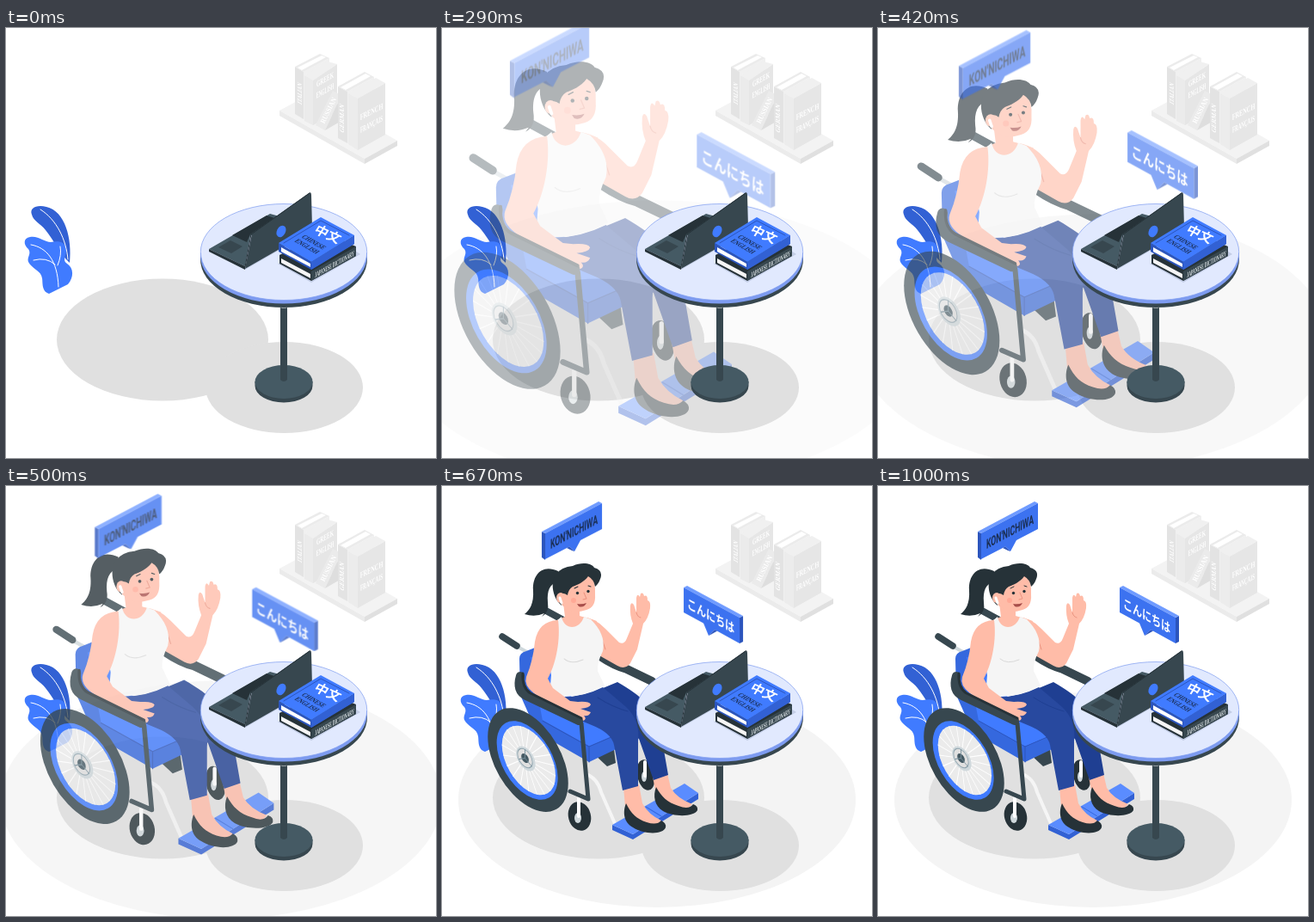
Write an HTML page that moves like this. It is 500x500 px and loops after 1040 ms.

```html
<!DOCTYPE html>
<html lang="en">
<head>
<meta charset="utf-8">
<style>
  html, body { margin: 0; width: 100%; height: 100%; overflow: hidden; background: #fff }
  svg { display: block; width: 100%; height: 100% }
  text { text-anchor: middle; dominant-baseline: central; font-weight: bold }
  .serif { font-family: "Liberation Serif", serif }
  .cjk { font-family: "Noto Sans CJK JP", "Noto Sans CJK", sans-serif }
  .line { fill: none; stroke-linecap: round; stroke-linejoin: round }
  .skin { fill: #ffbca8 }
  .dark { fill: #263238 }
  .frame { stroke: #37474f }
</style>
</head>
<body>
<svg viewBox="0 0 500 500">
  <ellipse id="floor" cx="250" cy="365" rx="231" ry="125" fill="#f4f4f4"/>
  <g fill="#e0e0e0">
    <ellipse cx="182" cy="362.5" rx="123" ry="71"/>
    <ellipse cx="323.5" cy="418" rx="91.5" ry="53"/>
  </g>

  <g id="shelf">
    <path fill="#f3f3f3" d="M318 96 357 75 455 131 417 152Z"/>
    <path fill="#ebebeb" d="M318 96 417 152V158L318 102Z"/>
    <path fill="#e0e0e0" d="M417 152 455 131V137L417 158Z"/>
    <path fill="#f0f0f0" d="M346 51 376 35V89L346 106Z"/>
    <path fill="#e3e3e3" d="M336 45 346 51V106L336 100Z"/>
    <path fill="#ebebeb" d="M336 45 365 30 376 35 346 51Z"/>
    <path fill="#fff" d="M339 46 367 32 372 34 344 49Z"/>
    <path fill="#e6e6e6" d="M357 61 385 42V98L357 113Z"/>
    <path fill="#ebebeb" d="M347 55 357 61V113L347 108Z"/>
    <path fill="#f0f0f0" d="M347 55 374 39 385 42 357 61Z"/>
    <path fill="#ebebeb" d="M360 113 380 73 390 78 371 119Z"/>
    <path fill="#dedede" d="M371 119 390 78V108Z"/>
    <path fill="#f0f0f0" d="M397 74 428 57V117L397 134Z"/>
    <path fill="#e3e3e3" d="M386 68 397 74V134L386 128Z"/>
    <path fill="#ebebeb" d="M386 68 417 51 428 57 397 74Z"/>
    <path fill="#fff" d="M389 69 418 53 424 56 395 72Z"/>
    <path fill="#e6e6e6" d="M409 82 441 64V124L409 142Z"/>
    <path fill="#ececec" d="M398 76 409 82V142L398 135Z"/>
    <path fill="#f0f0f0" d="M398 76 430 58 441 64 409 82Z"/>
    <g class="serif" fill="#fff" font-size="9">
      <text transform="matrix(0 -.65 .87 .5 341 76)">ITALIAN</text>
      <text transform="matrix(.62 -.36 0 1.1 371 60)">GREEK</text>
      <text transform="matrix(.5 -.29 0 1.1 371 73)">ENGLISH</text>
      <text transform="matrix(.36 -.74 .85 .45 375 96)">RUSSIAN</text>
      <text transform="matrix(0 -.8 .87 .5 391 105)">GERMAN</text>
      <text transform="matrix(.7 -.36 0 1.1 425 97)">FRENCH</text>
      <text transform="matrix(.56 -.3 0 1.1 425 112)">FRANÇAIS</text>
    </g>
  </g>

  <g id="plant">
    <path fill="#3261d4" d="M74 273C77 245 69 213 47 208C36 205 27 209 30 217C32 225 40 227 46 235C56 247 62 262 74 273Z"/>
    <path fill="#407bff" d="M50 309C41 306 43 296 42 291C41 282 30 280 26 272C24 266 30 263 26 257C20 252 20 244 28 243C37 241 45 249 52 249C60 247 69 248 70 257C70 266 65 270 71 274C79 279 79 290 72 298Z"/>
    <path class="line" stroke="#fff" d="M40 211C59 223 70 246 72 269M29 252C47 255 60 270 61 301M32 270Q47 266 57 275M63 254Q65 264 60 276"/>
  </g>

  <g id="person">
    <!-- backrest, far armrest and seat -->
    <path class="line frame" stroke-width="8" d="M121 145 143 157"/>
    <path class="line" stroke="#cfd8dc" stroke-width="4" d="M88 187 108 198"/>
    <path class="line frame" stroke-width="7.500" d="M70 175 87 186"/>
    <path fill="#37474f" d="M177 312 200 306 202 322 192 326Z"/>
    <path fill="#3568de" d="M90 201Q90 194 98 192L113 186 140 240 218 278 219 298 171 321 110 286 91 243Z"/>
    <path fill="#407bff" d="M103 199 135 195 142 240 220 282 171 303 117 273Z"/>
    <path class="line" stroke="#2c55bd" d="M117 273 171 303 220 282M171 303V321"/>
    <path class="line frame" stroke-width="10" d="M184 198Q200 209 215 213L244 227"/>
    <path class="line" stroke="#f5f5f5" stroke-width="4" d="M168 335Q181 340 185 356L203 397M226 318 236 340"/>
    <ellipse class="dark" cx="237" cy="336" rx="10" ry="18" transform="rotate(-12 237 336)"/>
    <ellipse fill="#cfd8dc" cx="235" cy="338" rx="3" ry="6"/>
    <path class="line" stroke="#fff" stroke-width="4" d="M236 321V337"/>

    <!-- footrests -->
    <path fill="#3261d4" d="M198 394 222 405 298 357V364L222 411 198 400Z"/>
    <path fill="#5a8cff" d="M198 394 282 346 298 357 222 405Z"/>
    <path class="line" stroke="#3568de" d="M237 373 255 384"/>

    <!-- legs -->
    <path class="skin" d="M245 338 262 334 266 351Q273 363 291 370L282 379 256 369 248 354Z"/>
    <path class="dark" d="M249 350C245 360 247 372 257 378C269 385 293 385 297 377Q298 372 292 370Q287 377 275 372C262 368 255 361 249 350Z"/>
    <path class="skin" d="M211 350 229 347 233 369Q240 382 255 389L246 399 221 389 213 373Z"/>
    <path class="dark" d="M214 369C210 379 211 391 222 397C234 405 257 406 260 397Q261 392 255 389Q250 395 238 391C226 387 220 381 214 369Z"/>
    <path fill="#1f3f92" d="M175 240 204 228C232 244 249 260 253 279L263 336 246 342 229 294 200 278Z"/>
    <path fill="#28499f" d="M125 244Q157 249 187 234L213 256Q231 272 228 298V349L210 354 200 301Q197 287 174 278L143 265Z"/>
    <path class="line" stroke="#1f3f92" d="M181 246Q198 257 216 262"/>

    <!-- raised arm -->
    <path class="skin" d="M162 152Q178 153 190 166L206 182Q212 185 215 177L222 160Q218 150 219 139Q220 134 223 138L226 147L226 130Q227 124 230 129L231 125Q234 123 235 128Q239 126 239 133Q243 134 242 142Q240 154 234 160L227 190 219 206Q213 214 204 209L181 196 170 180Z"/>
    <path class="line" stroke="#eb9481" d="M226 147Q227 152 231 153M187 181 190 190"/>

    <!-- torso -->
    <path class="skin" d="M141 136 160 143V151L180 157 171 179 134 178 124 160 143 152Z"/>
    <path fill="#f5f5f5" d="M133 157 139 152C142 168 160 168 165 152L173 155C184 166 190 178 187 192Q180 206 181 215L189 232Q156 250 125 243L127 220 124 204Z"/>
    <path class="line" stroke="#d9d9d9" d="M142 201Q150 208 164 202"/>
    <path class="skin" d="M135 156Q112 157 108 181Q106 203 98 222Q95 232 107 241L141 265Q149 272 164 273Q169 271 165 267Q171 268 173 263L161 259Q172 258 173 254Q171 250 158 251L149 250 129 235 123 224C133 206 138 178 135 156Z"/>

    <!-- head -->
    <path class="dark" d="M135 99C116 90 105 104 106 121C107 137 102 144 96 149Q108 153 119 148L116 152Q125 147 123 135C122 122 125 114 135 111Z"/>
    <path class="skin" d="M138 110 172 101Q179 112 178 126Q179 141 168 144Q159 147 151 146L140 139Q134 134 136 122Z"/>
    <path class="dark" d="M139 139C128 130 126 112 132 103Q139 94 152 93C163 88 174 90 177 95Q188 98 184 108Q182 114 178 117Q177 109 170 105C165 112 157 115 152 117Q147 120 146 127Q139 122 138 129Z"/>
    <ellipse class="skin" cx="138" cy="130" rx="5" ry="6"/>
    <path class="line" stroke="#fff" stroke-width="3" d="M137 130 139 136"/>
    <g class="dark"><circle cx="157.500" cy="124.500" r="1.700"/><circle cx="170" cy="122.500" r="1.700"/></g>
    <path class="line" stroke="#263238" d="M154 119 158 117M170 116 173 117"/>
    <path class="line" stroke="#eb9481" d="M165 124 168 131 164 132"/>
    <path fill="#a84f4b" d="M157 137Q163 138 168 136Q165 142 159 140Z"/>
    <circle cx="153" cy="133" r="3" fill="#ffa996"/>

    <!-- casters, near frame and wheel -->
    <ellipse class="dark" cx="160" cy="384" rx="13" ry="17" transform="rotate(-15 160 384)"/>
    <ellipse fill="#cfd8dc" cx="158" cy="386" rx="4" ry="6"/>
    <path class="line" stroke="#fff" stroke-width="4" d="M159 363V384"/>
    <path class="line frame" stroke-width="5" d="M162 276 170 364 149 355"/>
    <path class="line frame" stroke-width="10" d="M91 221Q86 238 98 244L159 273"/>
    <path class="line" stroke="#263238" stroke-width="3" d="M94 218Q93 235 103 241L162 270"/>
    <g transform="matrix(.866 .5 0 1 100 318.5)">
      <circle r="54" fill="#37474f"/>
      <circle r="41" cx="-1" cy="1" fill="#407bff"/>
      <circle r="36" cx="1" fill="#ebebeb"/>
      <g id="spokes" stroke="#fff"></g>
      <circle r="13" cx="-3" fill="#cfd8dc"/>
      <circle r="10" cx="-4" fill="#e0e0e0" stroke="#90a4ae"/>
      <circle r="5" cx="-4" fill="#455a64"/>
      <path class="line" stroke="#78909c" d="M-4 0V-10M-4 0 5 5M-4 0-12 5"/>
    </g>
  </g>

  <g id="bubbles">
    <g transform="translate(1 1)">
      <path fill="#2c55bd" d="M115 52 119 54V85L115 82Z"/>
      <path fill="#6f9bff" d="M115 52 181 17 185 19 119 54Z"/>
      <path fill="#3c72f0" d="M119 54 185 19V49L160 62 153 75 147 69.500 119 84Z"/>
      <path fill="#2c55bd" d="M147 69.500 153 75 150 74 144 71Z"/>
      <text transform="matrix(.56 -.3 0 1 152.500 52)" font-family="Roboto, sans-serif" font-size="15.500" fill="#1b2f55">KON'NICHIWA</text>
    </g>
    <path fill="#2c55bd" d="M346 153 350 151V181L346 183Z"/>
    <path fill="#6f9bff" d="M281 118 285 116 350 151 346 153Z"/>
    <path fill="#3c72f0" d="M281 118 346 153V183L317 167 310 174 304 159.500 281 147Z"/>
    <path fill="#2c55bd" d="M317 167 320 168.500 312 173 310 174Z"/>
    <text class="cjk" transform="matrix(.79 .43 0 1.1 312.500 150)" font-size="14" fill="#fff">こんにちは</text>
  </g>

  <g id="table">
    <path fill="#37474f" d="M226 261V269A97 56 0 0 0 420 269V261Z"/>
    <path fill="#7d9bf0" d="M226 261V264.500A97 56 0 0 0 420 264.500V261Z"/>
    <ellipse cx="323" cy="260.500" rx="96.700" ry="56" fill="#e1e9fe" stroke="#7d9bf0" stroke-width=".7"/>
    <path fill="#37474f" d="M289.500 411V416A33.500 19.500 0 0 0 356.500 416V411Z"/>
    <ellipse cx="323" cy="411.500" rx="33.500" ry="19.500" fill="#455a64"/>
    <path fill="#37474f" d="M319 325Q323 326 327 325V409Q323 413 319 409Z"/>

    <path fill="#c3cde6" d="M240 261 278 281 320 257 300 240ZM316 274 355 296 412 263 400 255Z"/>
    <path fill="#455a64" d="M236 257 307 216 318 219 284 242 278 277Z"/>
    <path fill="#263238" d="M263 241 303 218 312 221 284 240 280 249ZM236 257 278 277V281L236 260Z"/>
    <path fill="#37474f" d="M247 255 261 247 275 254 262 262Z"/>
    <path fill="#37474f" d="M286 239 352 192Q355 190 355 194L356 232Q356 235 353 237L278 280Z"/>
    <path class="line" stroke="#263238" d="M278 278 285 240 353 192"/>
    <ellipse cx="320" cy="236.500" rx="5" ry="7.200" transform="rotate(28 320 236.500)" fill="#407bff"/>

    <path fill="#263238" d="M318 264 368 238 407 254V265L355 294 318 274Z"/>
    <path fill="#f5f5f5" d="M320 268 354 286V291L320 273Z"/>
    <path fill="#37474f" d="M355 283 407 254V265L355 294Z"/>
    <text class="serif" transform="matrix(.48 -.27 0 1.1 382 275)" font-size="8" fill="#dfe5e8">JAPANESE DICTIONARY</text>
    <path fill="#2c55bd" d="M317 250 355 272 405 241V251L355 281 317 260Z"/>
    <path fill="#fff" d="M320 255 354 274V278L320 260Z"/>
    <path fill="#3261d4" d="M355 272 405 241V251L355 281Z"/>
    <path fill="#407bff" d="M317 250 366 220 405 241 355 272Z"/>
    <path class="line" stroke="#2c55bd" d="M323 250 366 224 399 241"/>
    <text class="cjk" transform="matrix(.9 .42 -.5 .78 375 238.500)" font-size="16" fill="#fff">中文</text>
    <g class="serif" font-size="9" fill="#1b2f55">
      <text transform="matrix(.62 .36 -.82 .5 358 249)">CHINESE</text>
      <text transform="matrix(.62 .36 -.82 .5 350 254)">ENGLISH</text>
    </g>
  </g>
</svg>
<script>
  const $ = id => document.getElementById(id);
  const LOOP = 1040, STEP = 1000 / 24;

  // each part zooms about its own centre
  const parts = [['floor', 250, 365], ['person', 175.5, 250], ['bubbles', 233, 100]];

  for (let i = 0; i < 20; i++) {
    const a = i * Math.PI / 10;
    $('spokes').innerHTML += `<path d="M-4 0L${36 * Math.cos(a) + 1} ${36 * Math.sin(a)}"/>`;
  }

  const bezier = (t, a, b) => 3 * (1 - t) ** 2 * t * a + 3 * (1 - t) * t * t * b + t ** 3;

  // cubic-bezier(.36, -.01, .5, 1.38)
  function ease(x) {
    let lo = 0, hi = 1;
    for (let i = 0; i < 30; i++) {
      const mid = (lo + hi) / 2;
      if (bezier(mid, .36, .5) < x) lo = mid; else hi = mid;
    }
    return bezier(hi, -.01, 1.38);
  }

  function draw(now) {
    const tick = Math.min(24, Math.floor((now % LOOP + 5) / STEP));
    const p = ease((tick + 1) / 25), scale = 1.5 - p / 2;
    for (const [id, x, y] of parts) {
      const part = $(id);
      part.setAttribute('transform', `translate(${x} ${y}) scale(${scale}) translate(${-x} ${-y})`);
      part.setAttribute('opacity', tick < 2 ? 0 : Math.max(0, Math.min(1, p)));
    }
  }

  const start = performance.now();
  function loop() {
    draw(performance.now() - start);
    requestAnimationFrame(loop);
  }
  loop();
</script>
</body>
</html>
```
